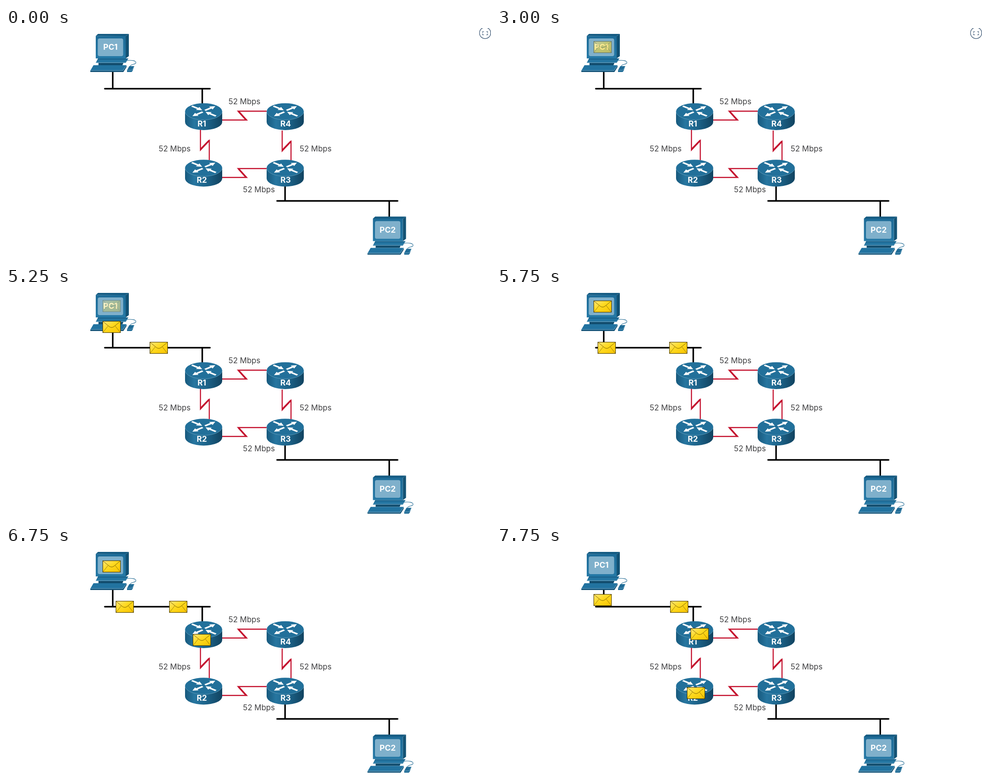
Write an HTML page that moves like this. It is 1070 px wide and 509 px high and loops after 8000 ms.

```html
<!DOCTYPE html>
<html lang="en">
<head>
<meta charset="utf-8">
<title>Packets between two PCs</title>
<style>
html, body { margin: 0; width: 100%; height: 100%; overflow: hidden; background: #fff; }
svg { display: block; }
text { font-family: Inter, "Open Sans", sans-serif; text-anchor: middle; }
.name { font-size: 17.5px; font-weight: 700; fill: #fff; }
.rate { font-size: 17px; fill: #414143; }
.wire { fill: none; stroke: #000; stroke-width: 3.4; stroke-linecap: round; }
.link { fill: none; stroke: #c4122f; stroke-width: 2.4; stroke-miterlimit: 10; }
.bolt { stroke: #c4122f; stroke-width: 3.6; }
</style>
</head>
<body>
<svg width="1070" height="509" viewBox="0 0 1070 509">
  <defs>
    <linearGradient id="body">
      <stop offset="0" stop-color="#17597d"/>
      <stop offset=".25" stop-color="#2776a0"/>
      <stop offset=".6" stop-color="#1c6288"/>
      <stop offset="1" stop-color="#114360"/>
    </linearGradient>
    <linearGradient id="paper" x2="1" y2="1">
      <stop offset="0" stop-color="#ffe67a"/>
      <stop offset=".45" stop-color="#ffd91f"/>
      <stop offset="1" stop-color="#f8c400"/>
    </linearGradient>
    <linearGradient id="case" x2="0" y2="1">
      <stop offset="0" stop-color="#1d6b97"/>
      <stop offset="1" stop-color="#2579a6"/>
    </linearGradient>

    <path id="arrow" d="M0 -2.1 L14 -2.1 L14 -5.5 L24.5 0 L14 5.5 L14 2.1 L0 2.1 Z" fill="#fff"/>

    <g id="router">
      <path d="M-41 0 V23 A41 18 0 0 0 41 23 V0 Z" fill="url(#body)"/>
      <ellipse rx="41" ry="18.3" fill="#22709a"/>
      <path d="M-41 0 A41 18.3 0 0 0 41 0" fill="none" stroke="#6aa3bf" stroke-width=".8"/>
      <use href="#arrow" transform="matrix(.93 .38 -.7 .6 -26 -12)"/>
      <use href="#arrow" transform="matrix(.93 -.38 .7 .6 3 -2.5)"/>
      <use href="#arrow" transform="matrix(-.93 .38 -.7 -.6 -2 1)"/>
      <use href="#arrow" transform="matrix(-.93 -.38 .7 -.6 27 10)"/>
    </g>

    <g id="pc">
      <path d="M264 18 L271 13 V62 L264 67 Z" fill="#135274"/>
      <path d="M198 17.5 L203 13 H271 L264 18 Z" fill="#155b82"/>
      <path d="M198 17.5 H264 V67 H198 Z" fill="url(#case)"/>
      <rect x="202.5" y="23" width="56" height="39" rx="4" fill="#7fb0cb"/>
      <path d="M203 67 H270 L264 77 H198 Z" fill="#1b6690"/>
      <path d="M198 77 L203 70 H268 L264 77 Z" fill="#2576a2"/>
      <path d="M198 76.4 H264 L270 67" fill="none" stroke="#8dbad1" stroke-width=".8"/>
      <path d="M204 77 H259 L257 82 H204 Z" fill="#124d6e"/>
      <path d="M193 82 H266 L258 94 H186 Z" fill="#2273a0"/>
      <path d="M186 94 H258 L266 82 V86 L259 97 H186 Z" fill="#155478"/>
      <path d="M186 93.6 H258 L266 82" fill="none" stroke="#8dbad1" stroke-width=".7"/>
      <path d="M265 72 C277 70 288 72 286.500 77 C285 81 276 79 274 84" fill="none" stroke="#286f96" stroke-width="1.1"/>
      <path d="M272 84 H283 L279 95 L277 97 H267 V93 Z" fill="#1f6b96"/>
      <path d="M267 93 H278 L283 84" fill="none" stroke="#8dbad1" stroke-width=".7"/>
    </g>

    <g id="mail" stroke="#4a3b00">
      <rect x=".5" y=".5" width="39" height="25" fill="url(#paper)" stroke-width="1.1"/>
      <path d="M1 25 L12.500 10.500 M39 25 L27.500 10.500" fill="none" stroke="#8f7200" stroke-width=".9"/>
      <path d="M1 1 L15 12.500 Q20 16 25 12.500 L39 1" fill="none" stroke="#7d6300" stroke-width="1"/>
    </g>
  </defs>

  <rect width="1070" height="509" fill="#fff"/>

  <g id="button">
    <circle cx="1057" cy="11" r="12.4" fill="#fff" stroke="#35516f" stroke-width="1.2"/>
    <path d="M1054.500 8 H1051.500 V10.500 M1059.500 8 H1062.500 V10.500 M1051.500 12.500 V15 H1054.500 M1062.500 12.500 V15 H1059.500"
      fill="none" stroke="#35516f" stroke-width="1.2"/>
  </g>

  <path class="wire" d="M218 133.700 H450 M235.500 97 V133 M433 134 V167"/>
  <path class="wire" d="M598 381 H864 M615.700 348 V381 M845.500 381 V417"/>

  <g id="links"></g>
  <g id="nodes"></g>
  <g id="mails"></g>
</svg>
<script>
const $ = id => document.getElementById(id);
const LOOP = 8000, STEP = 250;

const label = (cls, x, y, s) => `<text class="${cls}" x="${x}" y="${y}">${s}</text>`;
const router = (x, y, s) =>
  `<use href="#router" x="${x}" y="${y}"/>` + label('name', x - (x < 500 ? 4 : -1), y + 32.5, s);
const pc = (x, y, s) =>
  `<use href="#pc" x="${x}" y="${y}"/>` + label('name', x + 230.5, y + 48, s);

// Zigzag serial links, lying and standing
const flat = (x, y) =>
  `<path class="link" d="M${x} ${y} h54 l-19 -19.500 h63"/>` +
  `<path class="bolt" d="M${x + 53} ${y} l-17 -19"/>`;
const tall = (x, y) =>
  `<path class="link" d="M${x} ${y} v45 l19.500 -21 v43"/>` +
  `<path class="bolt" d="M${x} ${y + 43.5} l19.500 -20"/>`;

$('links').innerHTML = flat(477, 202.8) + flat(477, 329.3) + tall(429, 224) + tall(609.3, 226);
$('nodes').innerHTML =
  router(436, 184, 'R1') + router(616, 184, 'R4') +
  router(436, 308.5, 'R2') + router(616, 308.5, 'R3') +
  pc(0, 0, 'PC1') + pc(611.5, 402.5, 'PC2') +
  label('rate', 526, 168, '52 Mbps') + label('rate', 372, 272, '52 Mbps') +
  label('rate', 683, 272, '52 Mbps') + label('rate', 558, 362, '52 Mbps');

// Each packet: start and end of its fade-in, then stops as [time, x, y]
const packets = [
  { fade: [2750, 3250], stops: [[3250, 213, 30], [3500, 213, 59], [4250, 213, 113], [4375, 213, 121],
    [4500, 222, 121], [6000, 412, 121], [6250, 412, 145], [6500, 412, 162],
    [7250, 412, 259], [7500, 412, 291], [7750, 419, 311]] },
  { fade: [3850, 4650], stops: [[4750, 213, 33], [5250, 213, 75], [5680, 213, 121],
    [6250, 286, 121], [7100, 412, 121], [7250, 412, 143], [7500, 412, 165], [7750, 427, 181]] },
  { fade: [5050, 5750], stops: [[5750, 213, 30], [6250, 213, 83], [6540, 213, 121],
    [7250, 312, 121], [7750, 382, 121]] },
  { fade: [5900, 6600], stops: [[6750, 213, 32], [7250, 213, 70], [7750, 213, 106]] }
];

const clamp = v => Math.max(0, Math.min(1, v));

function place(stops, t) {
  const i = stops.findIndex(s => s[0] > t);
  if (i === 0) return [213, 29];
  if (i < 0) return stops[stops.length - 1].slice(1);
  const [t0, x0, y0] = stops[i - 1], [t1, x1, y1] = stops[i];
  const k = (t - t0) / (t1 - t0);
  return [x0 + (x1 - x0) * k, y0 + (y1 - y0) * k];
}

$('mails').innerHTML = packets.map(() => '<use href="#mail"/>').join('');
const mails = [...$('mails').children];

function draw(ms) {
  const t = Math.floor((ms % LOOP) / STEP) * STEP;
  $('button').style.display = t < 4250 ? '' : 'none';
  packets.forEach(({ fade: [from, to], stops }, i) => {
    const [x, y] = place(stops, t);
    mails[i].setAttribute('transform', `translate(${Math.round(x)} ${Math.round(y)})`);
    mails[i].setAttribute('opacity', clamp((t - from) / (to - from)));
  });
}

const start = performance.now();
function tick() {
  draw(performance.now() - start);
  requestAnimationFrame(tick);
}
tick();
</script>
</body>
</html>
```
